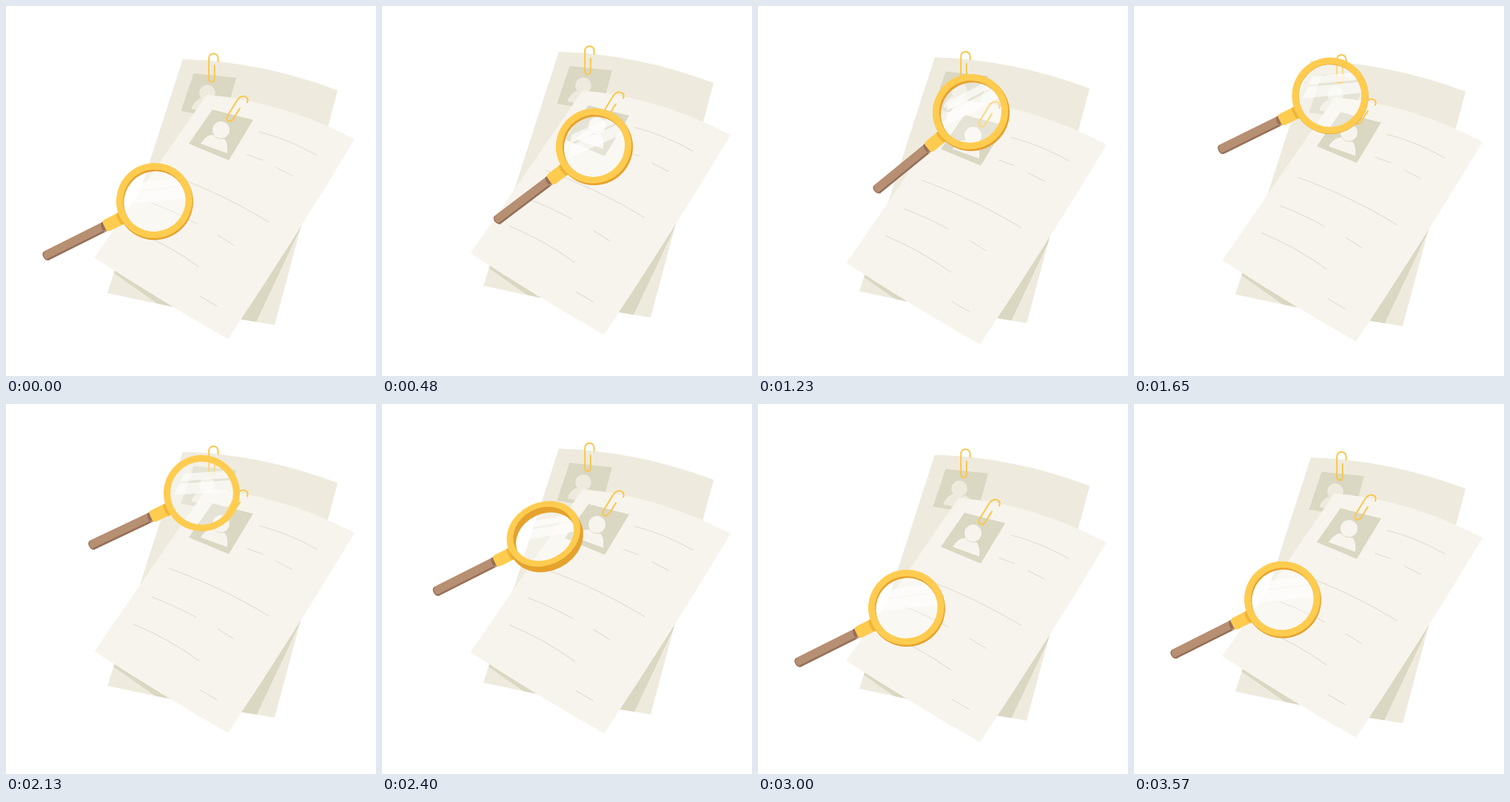
Animation, 500 px wide and 500 px high, one loop 3600 ms. Source, as an HTML page with a canvas:

```html
<!DOCTYPE html>
<html lang="en">
<head>
<meta charset="utf-8">
<title>Searching documents</title>
<style>
html, body { margin: 0; width: 100%; height: 100%; overflow: hidden; background: #fff; }
canvas { display: block; width: 500px; height: 500px; }
</style>
</head>
<body>
<canvas id="stage"></canvas>
<script>
const canvas = document.getElementById('stage');
const ctx = canvas.getContext('2d');
const dpr = window.devicePixelRatio || 1;
canvas.width = canvas.height = 500 * dpr;

const LOOP = 3600, STEP = 30, RAD = Math.PI / 180;
const PAPER = '#f7f4ed', BACK = '#eeebde', SHADE = '#dad7c2', RULE = '#e4e0d7';
const GOLD = '#ffcc50', AMBER = '#e6a22e', CLIP = '#f9c74c';
const WOOD = '#b78f73', WOOD_DARK = '#967059';

const P = d => new Path2D(d);
const shapes = {
  back: P('M239 72Q344 75 448 114L363 431Q250 413 137 388Z'),
  backPhoto: P('M253.5 91L311 97L296 152L236.500 142Z'),
  backBody: P('M250.500 139C253 131 259 125 265 124.500C269 128.500 276 129 280 126.500C287 130 290 138 289 147Z'),
  backClip: P('M286.600 75V70.500a6.200 6.200 0 0 0 -12.400 0V99a3.900 4.500 0 0 0 7.600 0V80.500'),
  front: P('M271 120Q371 128 471 180Q389 317 300 450Q210 399 119.500 340Z'),
  shadow: P('M130 350L210 406L330 444L399 298L430 150L250 200Z'),
  frontPhoto: P('M279 140L334 154L301 208.500L247 186Z'),
  frontBody: P('M263 186C268 178 275 173 281 174.500C284 179.500 290 181 295 179.500C299 184 300 191 299 199Z'),
  frontClip: P('M326 130.500C328 125 325 122 320.500 122C316.500 122 314 125 312 128L299 149C297 153 299 155.500 302 155.700C305 155.700 307 153 308 151L316 138.300'),
  rules: P('M342 170Q384 181 420 202M326 201L347 208.500M365 218L387 229.500' +
    'M221 228Q291 253 355 292M197 266.500Q228 278 257 294M286 309.500L307.500 323' +
    'M172 303Q222 324 260.500 352.500M262 392L285 405.500')
};

// time, centre x, centre y, handle angle, roll about the handle
const keys = [
  [0, 201, 270, 26.6, 10],
  [480, 287, 193, 37, 12],
  [800, 300, 162, 41, 12],
  [1230, 288, 138.5, 39.2, 12],
  [1620, 266, 125, 26.5, 3],
  [1850, 262, 124, 25.3, 0],
  [2130, 264.5, 126, 25.3, 0],
  [2640, 183, 238, 28, 64],
  [3000, 201, 270, 26.6, 10],
  [3600, 201, 270, 26.6, 10]
];

function slope(i, c) {
  if (i < 1 || i > keys.length - 2) return 0;
  const rise = j => (keys[j + 1][c] - keys[j][c]) / (keys[j + 1][0] - keys[j][0]);
  const a = rise(i - 1), b = rise(i);
  return a * b > 0 ? 2 * a * b / (a + b) : 0;
}

// monotone cubic through the keys
function pose(t, c) {
  let i = 0;
  while (i < keys.length - 2 && t >= keys[i + 1][0]) i++;
  const h = keys[i + 1][0] - keys[i][0], u = (t - keys[i][0]) / h, v = 1 - u;
  return keys[i][c] * (1 + 2 * u) * v * v + keys[i + 1][c] * u * u * (3 - 2 * u) +
    h * u * v * (slope(i, c) * v - slope(i + 1, c) * u);
}

const bob = (t, peak) => -6.8 * Math.cos(2 * Math.PI * (t - peak) / 1800);

function fill(path, color) {
  ctx.fillStyle = color;
  ctx.fill(path, 'evenodd');
}

function stroke(path, color, width) {
  ctx.strokeStyle = color;
  ctx.lineWidth = width;
  ctx.stroke(path);
}

function disc(x, y, r, color) {
  const p = new Path2D();
  p.arc(x, y, r, 0, 7);
  fill(p, color);
}

function shifted(dy, draw) {
  ctx.save();
  ctx.translate(0, dy);
  draw();
  ctx.restore();
}

function drawPapers(t) {
  const backY = bob(t, 680) - 4.9, frontY = bob(t, 415) + 0.8;
  shifted(backY, () => {
    fill(shapes.back, BACK);
    ctx.save();
    ctx.clip(shapes.back);
    shifted(frontY - backY, () => fill(shapes.shadow, SHADE));
    ctx.restore();
    // the part of the sheet above the cast shadow
    ctx.save();
    ctx.clip(shapes.back);
    ctx.fillStyle = BACK;
    ctx.fillRect(0, 0, 500, 240);
    ctx.restore();
    fill(shapes.backPhoto, SHADE);
    disc(272, 117.5, 10.7, BACK);
    fill(shapes.backBody, BACK);
    stroke(shapes.backClip, CLIP, 2);
  });
  shifted(frontY, () => {
    fill(shapes.front, PAPER);
    stroke(shapes.rules, RULE, 1.3);
    fill(shapes.frontPhoto, SHADE);
    disc(290.5, 167.5, 11.5, PAPER);
    fill(shapes.frontBody, PAPER);
    stroke(shapes.frontClip, CLIP, 2);
  });
}

const handle = P('M-73 -6.800H-163Q-168 -6.500 -168 0Q-168 6.500 -163 6.800H-73Z');
const handleShade = P('M-73 4.300H-165.500Q-164.500 6.800 -162 6.800H-73ZM-73 -6.800H-78Q-82 -1 -79 6.800H-73Z');
const handleEnd = P('M-164.500 -6Q-168.500 -4 -167.500 1Q-167 5 -163.500 6.500');
const collar = P('M-48 -8.500H-71Q-76 -8.500 -76 -4V4Q-76 8.500 -71 8.500H-48Z');
const collarShade = P('M-46 -8.500H-54Q-57 0 -54 8.500H-46Z');
const stripes = P('M-29 -15H46V0H-38ZM-22 -28H46V-18H-28Z');

function drawGlass(t) {
  const x = pose(t, 1), y = pose(t, 2) + bob(t, 150);
  const angle = pose(t, 3), roll = pose(t, 4) * RAD;
  const squash = Math.cos(roll), depth = 15 * Math.sin(roll);

  const ellipse = (r, off) => {
    const p = new Path2D();
    p.ellipse(0, off, r, r * squash, 0, 0, 2 * Math.PI);
    return p;
  };
  const ring = off => {
    const p = ellipse(51.5, off);
    p.addPath(ellipse(42.5, off));
    return p;
  };

  ctx.save();
  ctx.translate(x, y);
  ctx.rotate(-angle * RAD);

  fill(handle, WOOD);
  fill(handleShade, WOOD_DARK);
  stroke(handleEnd, WOOD_DARK, 1.2);
  fill(collar, GOLD);
  fill(collarShade, '#f0b638');

  ctx.save();
  ctx.clip(ellipse(43, 0));
  ctx.fillStyle = 'rgba(255,255,255,.3)';
  ctx.fillRect(-60, -60, 120, 120);
  ctx.scale(1, squash);
  ctx.rotate((angle - 6 - 1.7 * (angle - 26.6)) * RAD);
  fill(stripes, 'rgba(255,255,255,.65)');
  ctx.restore();

  const layers = Math.ceil(depth);
  for (let i = layers; i > 0; i--) fill(ring(depth * (i / layers - 0.5)), AMBER);
  fill(ring(-depth / 2), GOLD);
  ctx.restore();
}

function frame() {
  const t = Math.floor(performance.now() % LOOP / STEP) * STEP;
  ctx.setTransform(dpr, 0, 0, dpr, 0, 0);
  ctx.fillStyle = '#fff';
  ctx.fillRect(0, 0, 500, 500);
  ctx.lineCap = ctx.lineJoin = 'round';
  drawPapers(t);
  drawGlass(t);
  requestAnimationFrame(frame);
}
frame();
</script>
</body>
</html>
```
